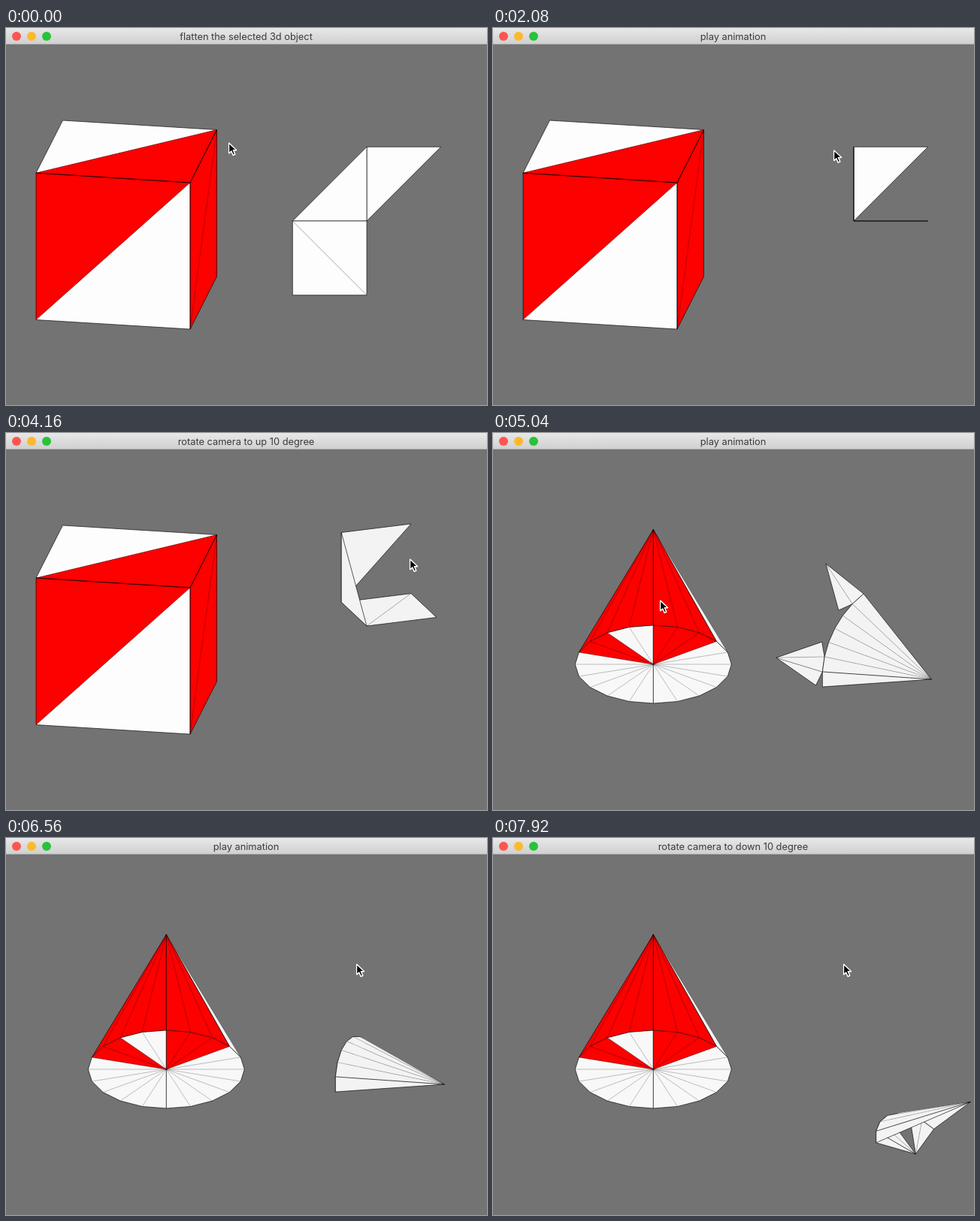
Recreate the animation shown at these times as an HTML page with a canvas. Size 640 by 502 pixels, loop 8000 ms.

```html
<!DOCTYPE html>
<html lang="en">
<head>
<meta charset="utf-8">
<title>Unfolding solids</title>
<style>
html, body { margin: 0; width: 100%; height: 100%; overflow: hidden; background: #737373; }
canvas { display: block; }
</style>
</head>
<body>
<canvas id="stage" width="640" height="502"></canvas>
<script>
const ctx = document.getElementById('stage').getContext('2d');
const LOOP = 8000, CONE_START = 4320;
const PIVOT = [480, 257];
const RED = '#fd0000', WHITE = '#fdfdfd', PALE = '#f3f3f3';
const INK = 'rgba(0,0,0,0.8)', FAINT = 'rgba(0,0,0,0.2)';
const { sin, cos, asin, atan2, acos, sqrt, PI } = Math;
const rad = d => d * PI / 180;
const clamp = v => Math.min(1, Math.max(0, v));

const TITLES = [
  [0, 'flatten the selected 3d object'],
  [80, 'play animation'],
  [3040, 'rotate camera to left 10 degree'],
  [3360, 'rotate camera to up 10 degree'],
  [4320, 'flatten the selected 3d object'],
  [4800, 'play animation'],
  [6640, 'rotate camera to right 10 degree'],
  [7200, 'rotate camera to down 10 degree']
];
const TURNS = {
  cube: { yaw: [3040, 3200], pitch: [3360, 3600], sign: 1 },
  cone: { yaw: [6640, 6800, 6960], pitch: [7200, 7360, 7600, 7760], sign: -1 }
};
const POINTER = [
  [1840, 296, 152], [2240, 537, 167], [4319, 537, 167],
  [4320, 222, 222], [5280, 222, 222], [5920, 466, 167]
];

// ---- drawing helpers

function path(points, close = true) {
  ctx.beginPath();
  points.forEach((p, i) => i ? ctx.lineTo(p[0], p[1]) : ctx.moveTo(p[0], p[1]));
  if (close) ctx.closePath();
}
function shape(points, fill, stroke, width = 0.8) {
  path(points);
  if (fill) { ctx.fillStyle = fill; ctx.fill(); }
  if (stroke) { ctx.strokeStyle = stroke; ctx.lineWidth = width; ctx.stroke(); }
}
function line(a, b, stroke = INK, width = 0.8) {
  path([a, b], false);
  ctx.strokeStyle = stroke;
  ctx.lineWidth = width;
  ctx.stroke();
}

// ---- folding nets: every face turns about its hinge, then follows its parent

function rotateAbout(p, a, b, angle) {
  const d = b.map((v, i) => v - a[i]);
  const len = Math.hypot(...d);
  const [kx, ky, kz] = d.map(v => v / len);
  const [x, y, z] = p.map((v, i) => v - a[i]);
  const c = cos(angle), s = sin(angle), dot = (kx * x + ky * y + kz * z) * (1 - c);
  return [
    a[0] + x * c + (ky * z - kz * y) * s + kx * dot,
    a[1] + y * c + (kz * x - kx * z) * s + ky * dot,
    a[2] + z * c + (kx * y - ky * x) * s + kz * dot
  ];
}
function foldPoint(p, face, amount) {
  for (; face; face = face.parent)
    if (face.hinge) p = rotateAbout(p, ...face.hinge, face.angle * amount);
  return p;
}

function cubeNet() {
  const e = 98.7, z = -e;
  const at = (x, y) => [x * e, y * e, z];
  const [top, hub, side, low] = [at(0, -1), at(0, 0), at(-1, 0), at(0, 1)];
  const all = [1, 1, 1];
  const base = { points: [top, at(1, -1), hub], dark: all };
  const wall = { points: [top, hub, side], parent: base, hinge: [top, hub], angle: PI / 2, dark: all };
  const floor = { points: [side, hub, low], parent: wall, hinge: [side, hub], angle: PI / 2, dark: [1, 1, 0] };
  const rest = { points: [side, low, at(-1, 1)], parent: floor, dark: [0, 1, 1] };
  return [base, wall, floor, rest];
}

function coneNet() {
  const slant = 145.3, r = 64.3, z = -131.6, half = rad(9);
  const apex = [103.3, 71, z];
  const step = 2 * asin(r * sin(half) / slant);
  const tilt = atan2(r * cos(half), sqrt(slant * slant - r * r));
  const bend = acos(cos(tilt) ** 2 * cos(2 * half) + sin(tilt) ** 2);
  const polar = (k, len) => [apex[0] - len * cos(k * step), apex[1] - len * sin(k * step), z];
  const rim = k => polar(k - 0.5, slant);
  const faces = [];
  for (let k = 0; k < 7; k++) {
    faces.push({
      points: [apex, rim(k), rim(k + 1)], parent: faces[k - 1],
      hinge: k ? [apex, rim(k)] : null, angle: -bend,
      dark: [k === 0, 1, k === 0 || k === 6]
    });
  }
  const addFlap = (k, both) => {
    const centre = polar(k, slant * cos(step / 2) + r * cos(half));
    const [a, b] = [rim(k), rim(k + 1)];
    const swing = (p, dir) => rotateAbout(p, centre, [centre[0], centre[1], z + 1], dir * 2 * half);
    const flap = { points: [centre, a, b], parent: faces[k], hinge: [a, b], angle: PI / 2 + tilt, dark: [0, 1, !both] };
    faces.push(flap, { points: [centre, a, swing(a, 1)], parent: flap, dark: [both, 1, 1] });
    if (both) faces.push({ points: [centre, b, swing(b, -1)], parent: flap, dark: [0, 1, 1] });
  };
  addFlap(1, true);
  addFlap(6, false);
  return faces;
}

const NETS = { cube: cubeNet(), cone: coneNet() };

function project([x, y, z], yaw, pitch) {
  const depth = z * cos(yaw) - x * sin(yaw);
  return [
    PIVOT[0] + x * cos(yaw) + z * sin(yaw),
    PIVOT[1] + y * cos(pitch) + depth * sin(pitch),
    depth * cos(pitch) - y * sin(pitch)
  ];
}

function drawNet(name, amount, t) {
  const turn = TURNS[name];
  const angleOf = times => rad(10 * turn.sign * times.filter(at => t >= at).length);
  const yaw = angleOf(turn.yaw), pitch = angleOf(turn.pitch);
  const fill = t < 3200 ? WHITE : PALE;
  NETS[name]
    .map(face => {
      const points = face.points.map(p => project(foldPoint(p, face, amount), yaw, pitch));
      return { points, dark: face.dark, depth: points[0][2] + points[1][2] + points[2][2] };
    })
    .sort((a, b) => a.depth - b.depth)
    .forEach(({ points, dark }) => {
      shape(points, fill);
      points.forEach((p, i) => line(p, points[(i + 1) % 3], dark[i] ? INK : FAINT));
    });
}

// ---- solids on the left

function drawCube() {
  const [A, B, C, D, E, F, G] =
    [[75.5, 123], [280.5, 135.5], [40, 193], [245, 206], [40, 388.5], [245, 401], [280.5, 331]];
  shape([A, B, C], WHITE);
  shape([B, D, C], RED);
  shape([C, D, E], RED);
  shape([D, F, E], WHITE);
  shape([D, B, G, F], RED);
  line(B, F, 'rgba(90,0,0,0.5)');
  line(C, B, 'rgba(60,0,0,0.6)');
  line(D, E, 'rgba(60,0,0,0.6)');
  shape([A, B, D, C], null, INK);
  shape([C, D, F, E], null, INK);
  shape([D, B, G, F], null, INK);
}

function drawCone() {
  const apex = [213.3, 128.5], centre = [213.3, 308];
  const rim = k => [213.3 + 104 * cos(rad(18 * k)), 308 - 52 * sin(rad(18 * k))];
  const arc = (from, to) => Array.from({ length: to - from + 1 }, (_, i) => rim(from + i));
  shape(arc(0, 19), '#f8f8f8');
  for (let k = 0; k < 20; k++) line(centre, rim(k), 'rgba(0,0,0,0.35)', 0.7);
  shape([apex, rim(1), rim(2)], PALE, 'rgba(0,0,0,0.5)', 0.6);
  shape([apex, ...arc(2, 9)], RED);
  for (const [from, to] of [[2, 5], [7, 9]]) shape([centre, ...arc(from, to)], RED);
  for (let k = 2; k < 10; k++) {
    line(apex, rim(k), 'rgba(50,0,0,0.5)', 0.7);
    if (k !== 6) line(centre, rim(k), 'rgba(50,0,0,0.5)', 0.7);
  }
  shape(arc(0, 19), null, INK);
  line(apex, rim(9), INK, 0.6);
  line(apex, rim(2), INK, 0.6);
  line(apex, centre, INK);
  line(centre, rim(15), INK);
}

// ---- window and pointer

function drawWindow(t) {
  ctx.fillStyle = '#737373';
  ctx.fillRect(0, 0, 640, 502);
  const bar = ctx.createLinearGradient(0, 0, 0, 22);
  bar.addColorStop(0, '#e8e8e8');
  bar.addColorStop(1, '#cfcfcf');
  ctx.fillStyle = bar;
  ctx.fillRect(0, 0, 640, 22);
  ctx.fillStyle = '#a9a9a9';
  ctx.fillRect(0, 21, 640, 1);
  ['#fc5650', '#fdb92c', '#27c33b'].forEach((colour, i) => {
    ctx.beginPath();
    ctx.arc(14 + 20 * i, 11, 6, 0, 2 * PI);
    ctx.fillStyle = colour;
    ctx.fill();
  });
  ctx.font = '12.8px Inter, Roboto, sans-serif';
  ctx.textAlign = 'center';
  ctx.textBaseline = 'alphabetic';
  ctx.fillStyle = '#3a3a3a';
  ctx.fillText(TITLES.filter(([at]) => t >= at).pop()[1], 319.5, 16);
}

function drawPointer(t) {
  const next = POINTER.findIndex(([at]) => at > t);
  const b = POINTER[next < 0 ? POINTER.length - 1 : next];
  const a = next > 0 ? POINTER[next - 1] : b;
  const u = a === b ? 1 : clamp((t - a[0]) / (b[0] - a[0]));
  const s = u * u * (3 - 2 * u);
  ctx.save();
  ctx.translate(a[1] + (b[1] - a[1]) * s, a[2] + (b[2] - a[2]) * s);
  ctx.lineJoin = 'round';
  shape([[0.8, 1.5], [0.8, 14.5], [3.8, 11.8], [6.2, 17.2], [8.6, 16.2], [6.2, 10.9], [10.3, 10.7]],
    '#000', '#fff', 1.8);
  shape([[1.3, 2.8], [1.3, 13.2], [4.1, 10.7], [6.6, 16.2], [7.7, 15.7], [5.2, 10.1], [9, 10]], '#000');
  ctx.restore();
}

function render(t) {
  drawWindow(t);
  ctx.lineJoin = 'round';
  const fold = (from, to) => clamp((t - from) / (to - from)) ** 1.4;
  if (t < CONE_START) {
    drawCube();
    drawNet('cube', fold(0, 880), t);
  } else {
    drawCone();
    drawNet('cone', fold(5020, 6160), t);
  }
  drawPointer(t);
}

function tick() {
  render(performance.now() % LOOP);
  requestAnimationFrame(tick);
}
tick();
</script>
</body>
</html>
```
